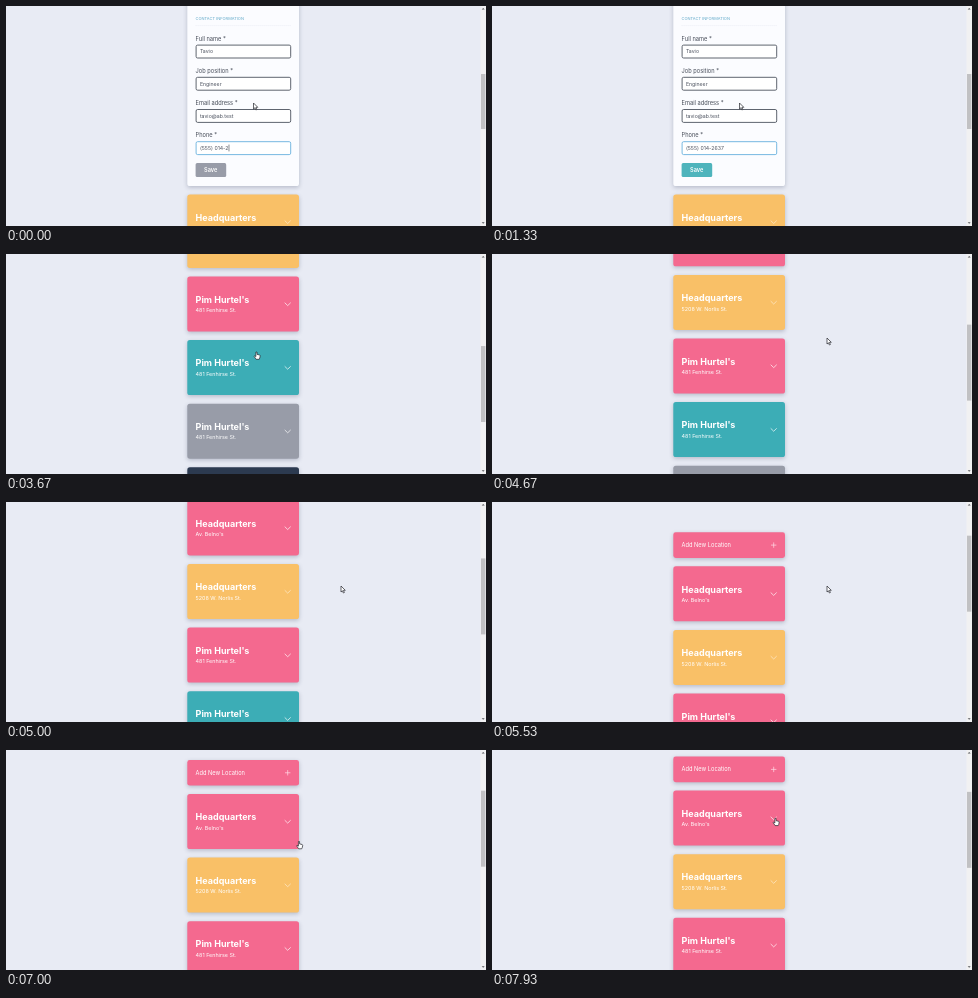
Write an HTML page with a canvas that moves like this. It is 480x220 px and loops after 8000 ms.

```html
<!DOCTYPE html>
<html lang="en">
<head>
<meta charset="utf-8">
<title>Locations</title>
<style>
html, body { margin: 0; width: 100%; height: 100%; overflow: hidden; background: #e8ebf4; }
canvas { display: block; width: 480px; height: 220px; }
</style>
</head>
<body>
<canvas id="stage"></canvas>
<script>
const W = 480, H = 220, LOOP = 8000;
const LEFT = 181.3, WIDTH = 111.7, TEXT_X = 189.6;
const CARD_H = 55, STEP = 63.6, BODY_H = 296;
const SAVED = 2870, FOLDED = 3500;
const PINK = '#f4698f', YELLOW = '#f9c067', TEAL = '#3cadb6', GRAY = '#989ca8', NAVY = '#2c3a50';
const PHONE = '(555) 014-2637';

const CARDS = [
  [PINK, 'Headquarters', "Av. Belno's"],
  [YELLOW, 'Headquarters', '5208 W. Norlis St.'],
  [PINK, "Pim Hurtel's", '481 Fenhirse St.'],
  [TEAL, "Pim Hurtel's", '481 Fenhirse St.'],
  [GRAY, "Pim Hurtel's", '481 Fenhirse St.'],
  [NAVY, "Pim Hurtel's", '481 Fenhirse St.']
];

// Rows: time, values
const LIST_Y = [[FOLDED, -104.7], [4200, -104.7], [4670, -42.8], [5530, 64.3], [6670, 64.3], [7000, 44], [7200, 40.6]];
const POINTER = [
  [SAVED, 247.5, 97], [3600, 250.5, 98], [3790, 250.5, 98], [4000, 335, 84], [5900, 335, 84],
  [6530, 293, 91.5], [7070, 293, 91.5], [7470, 284, 78], [7600, 283.5, 68.3]
];

const canvas = document.getElementById('stage');
const ctx = canvas.getContext('2d');
const dpr = window.devicePixelRatio || 1;
canvas.width = W * dpr;
canvas.height = H * dpr;

const clamp = v => Math.max(0, Math.min(1, v));
const smooth = p => p * p * (3 - 2 * p);
const span = (t, a, b) => clamp((t - a) / (b - a));

function track(rows, t, col = 1) {
  if (t <= rows[0][0]) return rows[0][col];
  for (let i = 1; i < rows.length; i++) {
    const a = rows[i - 1], b = rows[i];
    if (t < b[0]) return a[col] + (b[col] - a[col]) * span(t, a[0], b[0]);
  }
  return rows[rows.length - 1][col];
}

function mix(a, b, p) {
  return `rgb(${a.map((v, i) => Math.round(v + (b[i] - v) * p)).join()})`;
}

function box(x, y, w, h, r, fill, shadow) {
  ctx.save();
  if (shadow) {
    ctx.shadowColor = 'rgba(50,60,90,.28)';
    ctx.shadowBlur = 4 * dpr;
    ctx.shadowOffsetY = 1.5 * dpr;
  }
  ctx.fillStyle = fill;
  ctx.beginPath();
  ctx.roundRect(x, y, w, h, r);
  ctx.fill();
  ctx.restore();
}

// y is the middle of the capitals
function text(str, x, y, size, color, weight = 400) {
  ctx.font = `${weight} ${size}px Inter, "Open Sans", sans-serif`;
  ctx.fillStyle = color;
  ctx.fillText(str, x, y + size * 0.36);
  return ctx.measureText(str).width;
}

function stroke(points, color, width) {
  ctx.strokeStyle = color;
  ctx.lineWidth = width;
  ctx.beginPath();
  points.forEach(([x, y]) => ctx.lineTo(x, y));
  ctx.stroke();
}

function card([color, title, address], y) {
  if (y > H + 5 || y < -CARD_H - 8) return;
  box(LEFT, y, WIDTH, CARD_H, 2.6, color, true);
  text(title, TEXT_X, y + 23, 9, '#fff', 700);
  text(address, TEXT_X, y + 33.7, 5.4, '#fff');
  const tint = color === YELLOW ? 'rgba(255,255,255,.6)' : 'rgba(255,255,255,.85)';
  stroke([[278.7, y + 26.2], [281.7, y + 29.1], [284.7, y + 26.2]], tint, 0.8);
}

function addBar(y) {
  box(LEFT, y, WIDTH, 25.6, 2.4, PINK, true);
  text('Add New Location', TEXT_X, y + 12.8, 5.7, '#fff');
  stroke([[279, y + 12.8], [284.4, y + 12.8]], '#ffdbe5', 0.7);
  stroke([[281.7, y + 10.1], [281.7, y + 15.5]], '#ffdbe5', 0.7);
}

function input(y, border) {
  box(TEXT_X, y, 95.4, 13.6, 1.6, '#fff');
  ctx.strokeStyle = border;
  ctx.lineWidth = 0.9;
  ctx.beginPath();
  ctx.roundRect(TEXT_X + 0.5, y + 0.4, 94.6, 12.9, 1.5);
  ctx.stroke();
}

function field(label, y, value, hint, border = '#4c535f') {
  text(label + ' *', TEXT_X, y, 5.7, '#454b57');
  input(y + 6.2, border);
  return text(value || hint, 193.9, y + 13, 5.2, value ? '#4b515e' : '#a3a8b3');
}

function form(t, bottom) {
  const saved = t >= SAVED, y = saved ? 4.2 : 0;
  const val = s => saved ? '' : s;
  box(LEFT, -60, WIDTH, bottom + 60, 2.6, '#fbfcff', true);
  ctx.save();
  ctx.beginPath();
  ctx.rect(LEFT, 0, WIDTH, Math.max(0, bottom));
  ctx.clip();
  input(y - 15.9, '#4c535f');
  text('CONTACT INFORMATION', TEXT_X, y + 12.3, 4, '#62aac9');
  ctx.setLineDash([1, 1]);
  stroke([[TEXT_X, y + 19.6], [285, y + 19.6]], '#dde2ec', 0.6);
  ctx.setLineDash([]);

  field('Full name', y + 32.5, val('Tavio'), '');
  field('Job position', y + 64.7, val('Engineer'), '');
  field('Email address', y + 96.9, val('tavio@ab.test'), 'mail@domain.test');

  const typed = 11 + [70, 470, 800].filter(k => t >= k).length;
  const blur = span(t, 1730, 2000);
  const border = mix([104, 176, 222], [76, 83, 95], blur);
  const width = field('Phone', y + 129.1, val(PHONE.slice(0, typed)), '(xxx) xxx-xxxx', border);
  if (t < 1330) stroke([[194.4 + width, y + 138.6], [194.4 + width, y + 145.4]], '#333a46', 0.6);

  const by = saved ? 163 : 157.1;
  box(TEXT_X, by, 30.6, 14, 1.6, mix([152, 156, 168], [78, 180, 188], span(t, 830, 1130)));
  text('Save', 198, by + 6.8, 5.6, '#fff', 600);
  ctx.restore();
}

function scrollbar(scroll, content) {
  ctx.fillStyle = '#f1f1f2';
  ctx.fillRect(474.4, 0, 5.6, H);
  ctx.fillStyle = '#c1c1c3';
  ctx.fillRect(475, 5 + scroll * 210 / content, 4.4, H * 210 / content);
  ctx.fillStyle = '#55565a';
  for (const [base, tip] of [[3.6, 2], [216.2, 217.8]]) {
    ctx.beginPath();
    ctx.moveTo(475.7, base);
    ctx.lineTo(478.7, base);
    ctx.lineTo(477.2, tip);
    ctx.fill();
  }
}

function pointer(x, y, hand) {
  ctx.save();
  ctx.translate(x, y);
  ctx.lineJoin = 'round';
  ctx.lineWidth = 0.7;
  ctx.strokeStyle = '#23252b';
  ctx.fillStyle = '#fff';
  const shape = hand
    ? [[-0.6, 0], [0.5, 0], [0.6, 2.4], [3.2, 3], [3.7, 3.7], [3.3, 6], [2.7, 7.3], [-0.4, 7.3], [-2.3, 4.4], [-1.9, 3.7], [-0.6, 4.6]]
    : [[0, 0], [0, 6], [1.4, 4.8], [2.4, 7], [3.4, 6.5], [2.4, 4.4], [4.3, 4.3]];
  ctx.beginPath();
  shape.forEach(p => ctx.lineTo(...p));
  ctx.closePath();
  ctx.fill();
  ctx.stroke();
  ctx.restore();
}

function draw(t) {
  ctx.setTransform(dpr, 0, 0, dpr, 0, 0);
  ctx.fillStyle = '#e8ebf4';
  ctx.fillRect(0, 0, W, H);

  const saved = t >= SAVED;
  const fold = smooth(span(t, SAVED, FOLDED));
  const cards = saved ? CARDS : CARDS.slice(1);
  const top = !saved ? 188.4 : t < FOLDED ? 191.3 - BODY_H * fold : track(LIST_Y, t);

  if (t < FOLDED) form(t, saved ? top - 7.7 : 180);
  else addBar(top - 34);
  cards.forEach((c, i) => card(c, top + i * STEP));

  const scroll = t < FOLDED ? 252 : 252 - (top + 104.7);
  scrollbar(scroll, saved ? 608 + BODY_H * (1 - fold) : 840);

  const x = track(POINTER, t), y = track(POINTER, t, 2);
  const overCard = x >= LEFT && x <= LEFT + WIDTH + 0.5 &&
    cards.some((c, i) => y >= top + i * STEP && y <= top + i * STEP + CARD_H);
  pointer(x, y, overCard);
}

function tick() {
  draw(performance.now() % LOOP);
  requestAnimationFrame(tick);
}
tick();
</script>
</body>
</html>
```
